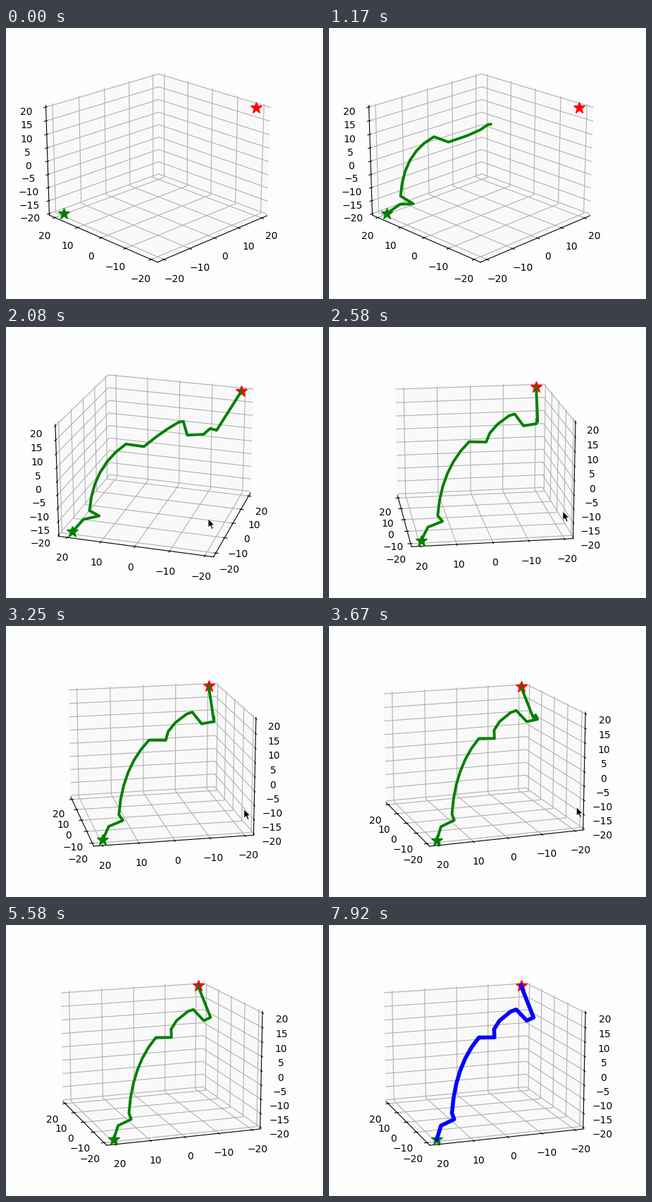
Write a matplotlib script that moves like this. It is 450 px wide and 384 px high and loops after 8000 ms.

```python
import numpy as np
import matplotlib.pyplot as plt
from matplotlib.animation import FuncAnimation

W, H, DPI = 450, 384, 100
LOOP, STEP = 8000, 50
PAPER, PANE = "#fefdfe", "#faf9fa"

# Square 3D axes: left, bottom and side in pixels
LEFT, BOTTOM, SIDE = 38.8, 17.8, 345
EDGE_XY, EDGE_Z = 22.45, 20.6

START = np.array([-19.5, 19.5, -20])
GOAL = -START

GREEN_FROM, GREEN_TO = 80, 1670
POINTER_ON, SHORTEN = 1700, 5330
BLUE_FROM, BLUE_STEPS, BLUE_GAP = 7000, 8, 83

# Turns of the view: begin, end, azimuth reached
AZIM = 225.3
TURNS = [(1690, 1790, 207.7), (1850, 2500, 171.7),
         (2580, 3230, 168.4), (3270, 3640, 160.9)]
TOP_AZIM = 207.7


def bend(a, b, steps=1, push=0):
    """Points from a up to, not including, b; the middle is pushed aside."""
    u = np.arange(steps)[:, None] / steps
    return a + (np.array(b) - a) * u + 4 * u * (1 - u) * np.array(push)


def route(*corners):
    """Join corners (point, steps, push) into one chain of points."""
    ends = [c[0] for c in corners[1:]]
    return np.vstack([bend(np.array(c[0]), end, *c[1:])
                      for c, end in zip(corners, ends)])


hook, side, last = (-14.8, 13, -15.5), (-6, -14.9, 14.6), (1.7, -16.7, 12.8)
climb = route((START, 2, 1), (hook,),
              ((-18.1, 14.7, -12), 6, (-1, 1.8, 2.2)), ((-13.4, 5.3, 11.7),),
              ((-12.4, 0.4, 11), 3, (3.2, 0.8, -1)), ((-4.5, -7.3, 17.3),),
              ((-5, -8.8, 18),), ((-8.1, -10.8, 14.7),), (last,))
detour = route((side, 2, (0, 0, 1.4)), (last,))
PATH = np.vstack([climb, detour, last, GOAL])
SHORT = np.vstack([climb, last, GOAL])

ARROW = np.array([(0, 0), (0, 13), (3, 10.3), (5.2, 15.2), (7.4, 14.2),
                  (5.3, 9.4), (9.2, 9.2)])

fig = plt.figure(figsize=(W / DPI, H / DPI), dpi=DPI, facecolor=PAPER)
ax = fig.add_axes([LEFT / W, BOTTOM / H, SIDE / W, SIDE / H], projection="3d")
ax.patch.set_visible(False)
for axis in (ax.xaxis, ax.yaxis, ax.zaxis):
    axis.set_pane_color(PANE)


def star(point, color):
    ax.plot(*point[:, None], "*", color=color, markersize=12)


star(START, "green")
star(GOAL, "red")
green, = ax.plot([], [], [], color="green", lw=2.8)
blue, = ax.plot([], [], [], color="blue", lw=4)

ax.set(xlim=(-EDGE_XY, EDGE_XY), ylim=(-EDGE_XY, EDGE_XY),
       zlim=(-EDGE_Z, EDGE_Z))
ax.set_xticks(range(-20, 21, 10))
ax.set_yticks(range(-20, 21, 10))
ax.set_zticks(range(-20, 21, 5))

# Pixel overlay for the mouse pointer
over = fig.add_axes([0, 0, 1, 1], zorder=10)
over.set(xlim=(0, W), ylim=(H, 0))
over.axis("off")
pointer = plt.Polygon(ARROW, fc="black", ec="white", lw=0.7)
over.add_patch(pointer)


def azimuth(t):
    azim = AZIM
    for begin, end, goal in TURNS:
        azim += (goal - azim) * np.clip((t - begin) / (end - begin), 0, 1)
    return azim


def show_part(line, points, share):
    """Show the first share of the segments of a path."""
    count = int(np.ceil(share * (len(points) - 1) - 1e-9))
    line.set_visible(count > 0)
    line.set_data_3d(*points[:count + 1].T)


def update(i):
    t = i * STEP

    # Tilt and pointer follow the turn
    azim = azimuth(t)
    turned = TOP_AZIM - azim
    ax.view_init(elev=25 - 0.23 * abs(turned), azim=azim)
    pointer.set_xy(ARROW + (267 + 1.8 * turned, 276 - 0.42 * abs(turned)))
    pointer.set_visible(POINTER_ON <= t < SHORTEN)

    drawn = np.clip((t - GREEN_FROM + 40) / (GREEN_TO - GREEN_FROM), 0, 1)
    show_part(green, PATH if t < SHORTEN else SHORT, drawn)

    steps = np.clip((t - BLUE_FROM) // BLUE_GAP + 1, 0, BLUE_STEPS)
    show_part(blue, SHORT, steps / BLUE_STEPS)
    return green, blue, pointer


anim = FuncAnimation(fig, update, frames=LOOP // STEP, interval=STEP,
                     init_func=lambda: update(0), repeat=True,
                     repeat_delay=0, blit=False)
plt.show()
```
